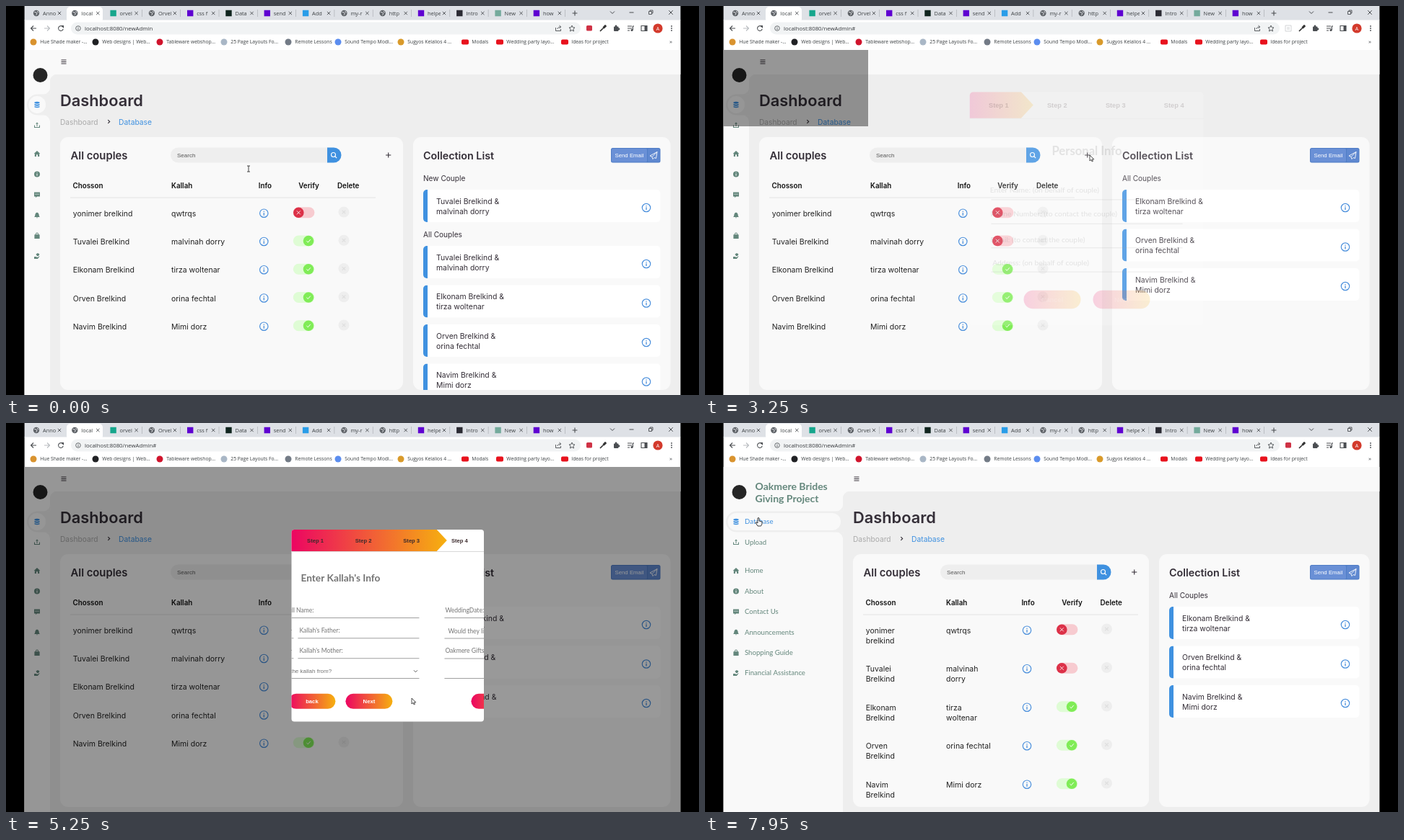
An HTML page with a canvas that plays this animation: 960x540 px, repeating every 8000 ms.

```html
<!DOCTYPE html>
<html lang="en">
<head>
<meta charset="utf-8">
<title>Dashboard</title>
<style>
html, body { margin: 0; width: 100%; height: 100%; overflow: hidden; background: #000; }
canvas { display: block; }
</style>
</head>
<body>
<canvas id="stage" width="960" height="540"></canvas>
<script>
const ctx = document.getElementById('stage').getContext('2d');
const LOOP = 8000, STEP = 50;
const UI = 'Inter, sans-serif', CHROME = '"Open Sans", sans-serif';
const ARIAL = '"Liberation Sans", Arial, sans-serif', LATO = 'Lato, sans-serif';
const BLUE = '#3f91e0', INK = '#342e37', GREEN = '#64877c', PANEL = '#f9f9f9', GREY = '#eee';

const couples = [
  ['yonimer brelkind', 'qwtrqs'],
  ['Tuvalei Brelkind', 'malvinah dorry'],
  ['Elkonam Brelkind', 'tirza woltenar'],
  ['Orven Brelkind', 'orina fechtal'],
  ['Navim Brelkind', 'Mimi dorz']
];

const clamp = k => Math.max(0, Math.min(1, k));
const smooth = k => (k = clamp(k), k * k * (3 - 2 * k));
const lerp = (a, b, k) => a + (b - a) * k;
const between = (t, a, b) => t >= a && t < b;

function text(s, x, y, size, color = INK, font = UI, weight = 400, align = 'left') {
  ctx.font = `${weight} ${size}px ${font}`;
  ctx.fillStyle = color;
  ctx.textAlign = align;
  ctx.fillText(s, x, y + size * 0.36);
}
function box(x, y, w, h, color, r = 0) {
  ctx.fillStyle = color;
  ctx.beginPath();
  ctx.roundRect(x, y, w, h, r);
  ctx.fill();
}
function dot(x, y, r, color) {
  ctx.fillStyle = color;
  ctx.beginPath();
  ctx.arc(x, y, r, 0, 7);
  ctx.fill();
}
function ring(x, y, r, color, width = 1, from = 0, to = 7) {
  ctx.strokeStyle = color;
  ctx.lineWidth = width;
  ctx.beginPath();
  ctx.arc(x, y, r, from, to);
  ctx.stroke();
}
function shape(d, x, y, stroke, width = 1, fill) {
  const path = new Path2D(d);
  ctx.save();
  ctx.translate(x, y);
  if (fill) { ctx.fillStyle = fill; ctx.fill(path); }
  if (stroke) { ctx.strokeStyle = stroke; ctx.lineWidth = width; ctx.stroke(path); }
  ctx.restore();
}
function clipped(x, y, w, h, r, draw) {
  ctx.save();
  ctx.beginPath();
  ctx.roundRect(x, y, w, h, r);
  ctx.clip();
  draw();
  ctx.restore();
}
const cross = (x, y, r, color, width = 1) => shape(`M${-r} ${-r}L${r} ${r}M${r} ${-r}L${-r} ${r}`, x, y, color, width);
const plus = (x, y, r, color) => shape(`M${-r} 0H${r}M0 ${-r}V${r}`, x, y, color, 1.1);
const chevron = (x, y) => shape('M-2.5 -1.2L0 1.3L2.5 -1.2', x, y, '#555', 1);
const line = (x1, x2, y, color) => box(x1, y - 0.5, x2 - x1, 1, color);

/* ---------- browser frame ---------- */

const tabs = [
  ['Anno', 'globe'], ['local', 'globe'], ['orvel', '#16a68c'], ['Orvel', 'globe'], ['css f', '#5f01d1'],
  ['Data', '#10251f'], ['send', '#5f01d1'], ['Add', '#2a9de8'], ['my-r', 'globe'], ['http', 'globe'],
  ['helpe', '#5f01d1'], ['Intro', '#2b2b33'], ['New', '#74aa9c'], ['how', '#5f01d1']
];
const bookmarks = [
  [38, '#d9932f', 'Hue Shade maker -...'], [124, '#202124', 'Web designs | Web...'], [213, '#d0142c', 'Tableware webshop...'],
  [302, '#a9b7c6', '25 Page Layouts Fo...'], [391, '#737b86', 'Remote Lessons'], [460, '#5b8def', 'Sound Tempo Modi...'],
  [547, '#d99a2b', 'Sugyos Kelalios 4 ...'], [636, '#e8121d', 'Modals'], [684, '#e8121d', 'Wedding party layo...'],
  [774, '#e8121d', 'Ideas for project']
];

function globe(x, y) {
  dot(x, y, 4.2, '#5f6368');
  shape('M-2.8 -1.5L0 -1L1 1L-.5 2.8M1.2 -3L2.8 -.5', x, y, '#dfe1e5', 1);
}

function browser(t) {
  const loading = between(t, 1700, 2450), dark = '#4a4d51';
  box(25, 0, 910, 20, '#dee1e6');
  box(25, 19.5, 910, 41.5, '#fff');
  box(84, 1, 50, 22, '#fff', 5);
  tabs.forEach(([name, icon], i) => {
    const x = 42 + i * 53.3;
    if (i === 1 && loading) ring(x, 10, 4, '#9aa0a6', 1, t / 90, t / 90 + 1.6);
    else if (icon === 'globe') globe(x, 10);
    else box(x - 4.2, 5.8, 8.4, 8.4, icon);
    clipped(x + 8, 2, 19, 16, 0, () => text(name, x + 9, 10, 7.4, '#3c4043', CHROME));
    cross(x + 32, 10, 2.2, dark, 0.9);
    if (i > 1) box(x + 39.5, 5, 0.6, 10, '#a5a8ad');
  });
  plus(788, 10, 3.4, dark);
  shape('M-3 -1.5L0 1.5L3 -1.5', 840, 9, dark);
  line(863.5, 869.5, 9, dark);
  shape('M-2.5 -1.5H1.5V2.5H-2.5ZM-1 -1.5V-3H3V1H1.5', 893, 9, dark, 0.9);
  cross(921, 9, 2.8, dark);

  shape('M4 0H-3.5M0 -3.5L-3.5 0L0 3.5', 38, 31, dark, 1.1);
  shape('M-4 0H3.5M0 -3.5L3.5 0L0 3.5', 57, 31, '#b9bcc0', 1.1);
  if (loading) cross(76, 31, 3, dark, 1.1);
  else {
    ring(76, 31, 3.4, dark, 1.1, 0.3, 5.6);
    shape('M0 -4H4V0Z', 76, 31, null, 0, dark);
  }
  box(90, 22.5, 706, 17, '#f1f3f4', 8.5);
  ring(100, 31, 3.3, dark, 0.8);
  shape('M0 -.4V2M0 -2V-1.2', 100, 31, dark, 0.9);
  text('localhost:8080/newAdmin' + (t >= 3250 ? '#' : ''), 109, 31, 7.8, '#35383c', CHROME);

  shape('M-3.5 -1V3.5H3.5V1M-1 1C-1 -1 1 -2 3.5 -2M1.5 -4L3.8 -2L1.5 0', 765, 31, dark, 0.9);
  shape('M0 -4L1.2 -1.3L4 -1L1.9 1L2.5 4L0 2.5L-2.5 4L-1.9 1L-4 -1L-1.2 -1.3Z', 784, 31, dark, 0.9);
  if (between(t, 2450, 4550)) {
    shape('M-4 -4H4V4H-4ZM-2 -1H2M-2 1H2', 808, 31, '#d2d4d6', 1);
  } else box(804, 27, 8, 7.5, '#cf3245', 1.5);
  shape('M-4 4L1 -1M0 -2L2 0M1 -2L3 -4L4 -3L2 -1Z', 827, 31, '#333', 1.7);
  box(842, 28.5, 6.5, 6.5, dark, 1);
  dot(845, 28, 1.4, dark);
  dot(849, 32, 1.4, dark);
  shape('M-4 -3H2M-4 0H2M-4 3H-1M3.3 -3V2.5M3 -3H5', 865, 31, dark, 1.2);
  dot(867, 33.5, 1.5, dark);
  shape('M-4 -3.5H4V3.5H-4Z', 884, 31, dark, 1.1);
  box(884.5, 27.5, 3.5, 7, dark);
  dot(903, 31, 6.6, '#d33a2c');
  text('A', 903, 31, 7, '#fff', CHROME, 400, 'center');
  [-3, 0, 3].forEach(d => dot(922, 31 + d, 0.9, dark));

  bookmarks.forEach(([x, color, name], i) => {
    if (i > 6) box(x - 5, 46.5, 10, 7, color, 2);
    else dot(x, 50, 4.5, color);
    text(name, x + 9.3, 50, 6.75, '#3c4043', CHROME);
  });
  text('»', 921, 49.5, 8, dark, CHROME, 400, 'center');
}

/* ---------- dashboard ---------- */

const menu = [
  ['Database', 137], ['Upload', 165.5], ['Home', 205], ['About', 233.5], ['Contact Us', 262],
  ['Announcements', 290.5], ['Shopping Guide', 319], ['Financial Assistance', 347]
];
const menuIcons = [
  'M-3.5 -3.5Q0 -5 3.5 -3.5V-2Q0 -.5 -3.5 -2ZM-3.5 -1Q0 .5 3.5 -1V1Q0 2.3 -3.5 1ZM-3.5 2Q0 3.3 3.5 2V3.5Q0 5 -3.5 3.5Z',
  'M-4 0H-3V2.5H3V0H4V3.5H-4ZM-.5 1.5V-2H-2L0 -4L2 -2H.5V1.5Z',
  'M-4.3 0L0 -4L4.3 0H3.2V4H1V1.2H-1V4H-3.2V0Z',
  'M-4 0A4 4 0 1 1 4 0A4 4 0 1 1 -4 0Z',
  'M-4 -3.5H4V2.5H0L-2 4V2.5H-4Z',
  'M-4 2.5Q-2.7 1.5 -2.6 -1Q-2.3 -3.6 0 -4Q2.3 -3.6 2.6 -1Q2.7 1.5 4 2.5ZM-1 3H1Q0 5 -1 3Z',
  'M-3.6 -1.8H3.6V4H-3.6ZM-2 -1.8V-2.5A2 2 0 0 1 2 -2.5V-1.8H1.1V-2.3A1.1 1.1 0 0 0 -1.1 -2.3V-1.8Z',
  'M-4 1H-1L0 2L4 0L1 4H-4ZM1 -4L3.5 -2.5L2 0H0L-1.5 -2.5Z'
];

function infoIcon(x, y) {
  ring(x, y, 5.7, '#4a8fdc', 1.2);
  shape('M0 -.8V3M0 -3V-1.8', x, y, '#4a8fdc', 1.3);
}

function toggle(x, y, on) {
  const green = on > 0.5, cx = lerp(x - 6.7, x + 7, on);
  box(x - 14.2, y - 7.5, 29.6, 15, green ? '#dffcd5' : '#f7cbd0', 7.5);
  dot(cx, y, 7.3, green ? '#80ec57' : '#dc3148');
  if (green) shape('M-2.6 .2L-.7 2L2.8 -2', cx, y, '#fff', 1);
  else cross(cx, y, 2.5, '#f9dfe2', 1);
}

function sidebar(right, open) {
  box(25, 61, right - 25, 479, PANEL);
  box(right - 0.5, 61, 935.5 - right, 34, PANEL);
  shape('M0 0H11A11 11 0 0 0 0 11Z', right - 0.5, 94.5, null, 0, PANEL);
  box(29, 122.5, right - 28, 29, GREY, [14.5, 0, 0, 14.5]);
  shape('M0 0V-10A10 10 0 0 1 -10 0Z', right + 0.2, 122.7, null, 0, GREY);
  shape('M0 0V10A10 10 0 0 0 -10 0Z', right + 0.2, 151.3, null, 0, GREY);
  box(31.5, 125, lerp(55, 188, open) - 31.5, 24, PANEL, 12);
  dot(47.5, 96, 10, '#262626');
  menu.forEach(([, y], i) => shape(menuIcons[i], 43, y, null, 0, i ? GREEN : BLUE));
  shape('M0 -.5V2.2M0 -2.3V-1.3', 43, 233.5, '#fff', 1);
  [-2, 0, 2].forEach(d => dot(43 + d, 261.2, 0.6, '#fff'));
  if (open > 0) clipped(25, 61, right - 28, 479, 0, () => {
    text('Oakmere Brides', 69.5, 88, 14, GREEN, LATO, 700);
    text('Giving Project', 69.5, 105, 14, GREEN, LATO, 700);
    menu.forEach(([name, y], i) => text(name, 55, y, 9.6, i ? GREEN : BLUE, LATO));
  });
  [-2.5, 0, 2.5].forEach(d => line(right + 15.5, right + 22.5, 77.5 + d, INK));
}

function couplesTable(x, right, t, open) {
  const wrap = open > 0.35, pitch = wrap ? 53.5 : 39.25;
  const at = (a, b) => x + lerp(a, b, open);
  const kallah = at(154, 129), info = at(282.3, 241), verify = at(337, 296), del = at(393, 351.5);
  const end = at(437, 395), search = at(153, 121);

  box(x, 182, right - x, 351, PANEL, 11);
  text('All couples', x + 14.5, 207.5, 14.8, INK, UI, 600);
  box(search, 196.5, 218, 21, GREY, [10.5, 0, 0, 10.5]);
  text('Search', search + 9, 207, 8, '#555', ARIAL);
  box(search + 217, 196.5, 19.5, 21, BLUE, [0, 10.5, 10.5, 0]);
  ring(search + 225.5, 206.5, 3, '#fff', 1.1);
  shape('M0 0L2.5 2.5', search + 227.7, 208.7, '#fff', 1.2);
  plus(right - 20.3, 207, 3.6, INK);

  const head = (s, hx, align) => text(s, hx, 249, 9.8, '#111', UI, 600, align);
  head('Chosson', x + 17.5);
  head('Kallah', kallah);
  head('Info', info + 1.5, 'center');
  head('Verify', verify + 7.5, 'center');
  head('Delete', del + 6.2, 'center');
  line(x + 14, end, 266, '#e3e3e3');

  clipped(x, 266, right - x, 254, 0, () => couples.forEach(([chosson, bride], i) => {
    const y = 288 + i * pitch;
    const hover = i === 1 && between(t, 1050, 2500);
    if (hover) box(x + 14, y - 22.2, end - x - 14, 38.8, '#ececec');
    const parts = wrap ? chosson.split(' ') : [chosson];
    const brideParts = wrap && bride.length > 13 ? bride.split(' ') : [bride];
    parts.forEach((s, n) => text(s, x + 17.7, y + n * 14.2, 10.5, '#222'));
    brideParts.forEach((s, n) => text(s, kallah, y + n * 14.2, 10.5, '#222'));
    infoIcon(info, y - 0.3);
    const on = i === 0 ? 0 : i === 1 ? 1 - clamp((t - 1650) / 200) : 1;
    if (i === 1 && between(t, 1650, 2450)) {
      box(verify - 16, y - 10, 32.5, 17.5, '#111', 8.7);
      box(verify - 15, y - 9, 30.5, 15.5, '#fff', 7.7);
    }
    toggle(verify, y - 1.2, on);
    dot(del, y - 2, 7.5, hover ? '#d3313f' : '#eee');
    cross(del, y - 2, 2.3, hover ? '#fff' : '#e0e0e0', hover ? 1.8 : 1.3);
  }));
}

function collection(x, t) {
  box(x, 182, 920.5 - x, 351, PANEL, 11);
  text('Collection List', x + 14, 207.5, 14.3, INK, UI, 600);
  box(838, 197, 68.5, 20.5, '#4f7dc6', 2.5);
  box(839, 198, 49, 18.5, '#6a90d6', 1.5);
  box(889, 198, 16.5, 18.5, '#5f88d0', 1.5);
  text('Send Email', 843.5, 207.2, 7.8, '#fff', ARIAL);
  shape('M5 -5L-5 .5L-2 2L-1 5L1 3L3.5 4ZM5 -5L-2 2', 897, 207.5, '#fff', 0.9);

  const card = ([chosson, bride], y) => {
    box(x + 15, y, 891.5 - x, 45, '#fff', 5);
    clipped(x + 14, y, 40, 45, 5, () => box(x + 14, y, 6, 45, BLUE));
    text(chosson + ' &', x + 32, y + 16, 10.4);
    text(bride, x + 32, y + 30, 10.4);
    infoIcon(887, y + 25);
  };
  clipped(x, 182, 921 - x, 351, 11, () => {
    const reloaded = t >= 2450, top = reloaded ? 255 : 333;
    if (!reloaded) {
      text('New Couple', x + 14, 239.7, 10.1);
      card(couples[1], 255);
    }
    text('All Couples', x + 14, top - 15.5, 10.1);
    couples.slice(reloaded ? 2 : 1).forEach((c, i) => card(c, top + i * 54.5));
  });
}

function page(t) {
  const open = smooth((t - 7270) / 320);
  const right = 61 + 130 * open, left = right + 14;
  box(25, 61, 910, 479, GREY);
  sidebar(right, open);
  text('Dashboard', left, 131.5, 21.8, INK, UI, 600);
  text('Dashboard', left, 161, 10.2, '#aaa');
  shape('M-1.2 -2.3L1.2 0L-1.2 2.3', left + 67.5, 160.5, INK, 1.1);
  text('Database', left + 81, 161, 10.3, BLUE);
  couplesTable(left, lerp(550, 615, open), t, open);
  collection(lerp(564, 629, open), t);
}

/* ---------- step form ---------- */

const slideStarts = [3966, 4550, 5150], slideWidths = [259, 256, 253];

function warmGradient(x1, x2) {
  const g = ctx.createLinearGradient(x1, 0, x2, 0);
  g.addColorStop(0, '#ec0562');
  g.addColorStop(1, '#f6b00f');
  return g;
}
function formButtons(cx, y, labels) {
  labels.forEach((label, i) => {
    const x = cx + (i ? 7 : -72);
    box(x, y - 10.5, 65, 21, warmGradient(x, x + 65), 10.5);
    text(label, x + 32.5, y, 7.7, '#fff', ARIAL, 700, 'center');
  });
}
const formLine = (cx, a, b, y) => line(cx + a, cx + b, y, '#a0a0a0');
const label = (s, x, y, font = LATO, align) => text(s, x, y, font === LATO ? 8.5 : 8, '#757575', font, 400, align);
const heading = (s, cx) => text(s, cx, 215.5, 13.7, '#747474', LATO, 700, 'center');

function personalPage(cx) {
  heading('Personal Info', cx);
  [['Enter Name: (on behalf of couple)', 14, 260], ['Phone Number: (to contact the couple)', 34.5, 286.7],
   ['Email: (to contact the couple)', -2, 316.3], ['Address: (on behalf of couple)', 2.5, 343]
  ].forEach(([s, end, y], i) => {
    label(s, cx + end, y, LATO, 'right');
    formLine(cx, -109, 109, 271 + i * 27.5);
  });
  formButtons(cx, 385, ['Cancel', 'Next']);
}
function familyPage(cx, who, back) {
  heading(`Enter ${who}'s Info`, cx);
  label(`${who}'s Full Name:`, cx - 107, 260);
  formLine(cx, -109, 109, 270.5);
  ['Father', 'Mother'].forEach((parent, i) => {
    const y = 288.3 + i * 28;
    label('Title', cx - 103, y - 0.3, ARIAL);
    chevron(cx - 70, y);
    formLine(cx, -109, -65, y + 10.5);
    label(`${who}'s ${parent}:`, cx - 57, y);
    formLine(cx, -59, 109, y + 10.5);
  });
  label(`Where is the ${who.toLowerCase()} from?`, cx - 103, 344, ARIAL);
  chevron(cx + 104, 344.5);
  formLine(cx, -109, 109, 354.5);
  formButtons(cx, 386.3, [back, 'Next']);
}
function weddingPage(cx) {
  heading('Wedding Info', cx);
  label('WeddingDate:', cx - 108, 260);
  label('Would they like a shower?', cx - 104, 288.5);
  label('Oakmere Gifts:', cx - 108, 316.3);
  [270.5, 299, 327, 354.5].forEach(y => formLine(cx, -109, 109, y));
  formButtons(cx, 386.3, ['Back', 'Submit']);
}

function modal(t) {
  if (!between(t, 3250, 6250)) return;
  const enter = clamp((t - 3190) / 260), leave = clamp((t - 6000) / 250);
  const alpha = enter ** 1.2 * (1 - leave);
  if (t < 3300) box(25, 61, 201, 106, 'rgba(0,0,0,.4)');
  else box(25, 61, 910, 479, `rgba(0,0,0,${0.4 * alpha})`);

  const moved = duration => slideStarts.map(s => smooth((t - s) / duration));
  const scroll = moved(300).reduce((sum, k, i) => sum + k * slideWidths[i], 0);
  const tip = 468 + 66.5 * moved(415).reduce((a, b) => a + b);
  const scale = 1.28 - 0.28 * enter;

  ctx.save();
  ctx.globalAlpha = alpha;
  ctx.translate(529, 281);
  ctx.scale(scale, scale);
  ctx.translate(-529, -281);
  clipped(395.5, 148, 266.5, 266.5, 4, () => {
    box(395, 148, 268, 267, '#fff');
    line(395, 663, 178.5, '#d8d8d8');
    shape(`M395 148H${tip - 14}L${tip} 163L${tip - 14} 178H395Z`, 0, 0, null, 0, warmGradient(395, tip));
    for (let i = 0; i < 4; i++) text(`Step ${i + 1}`, 428.5 + i * 66.6, 163, 7.6, '#3b2a2c', ARIAL, 700, 'center');
    const start = 529 - scroll;
    personalPage(start);
    familyPage(start + 259, 'Chosson', 'Back');
    familyPage(start + 515, 'Kallah', 'back');
    weddingPage(start + 768);
  });
  ctx.restore();
}

/* ---------- pointer ---------- */

const pointerPath = [
  [600, 336, 226], [1050, 382, 307], [1200, 382, 307], [1300, 433, 316], [1450, 433, 316], [1500, 425, 322],
  [1650, 421, 324], [2450, 421, 324], [2650, 530, 206], [2800, 533, 207], [3550, 533, 207], [3650, 555, 370],
  [3850, 562, 382], [5700, 562, 382], [5950, 355, 91], [6550, 355, 91], [6950, 88, 82], [7150, 83, 79],
  [7550, 83, 79], [7850, 74, 132]
];

function pointer(t) {
  const next = pointerPath.findIndex(p => p[0] > t);
  const b = pointerPath[next < 0 ? pointerPath.length - 1 : next];
  const a = next > 0 ? pointerPath[next - 1] : b;
  const k = a === b ? 0 : smooth((t - a[0]) / (b[0] - a[0]));
  const x = lerp(a[1], b[1], k), y = lerp(a[2], b[2], k);
  if (t < 1000) shape('M-2 -4H2M0 -4V4M-2 4H2', x, y, '#333', 0.9);
  else if (t >= 7750) shape('M-1 0Q0 -1 1 0V4L5 5V8L3.5 11H-1L-4 6Q-3 5 -1 7Z', x, y, '#222', 0.9, '#fff');
  else shape('M0 0V8L1.9 6.3L3.2 9L4.4 8.4L3.2 5.9H5.8Z', x, y, '#222', 0.8, '#fff');
}

function frame() {
  const t = Math.floor(performance.now() % LOOP / STEP) * STEP;
  box(0, 0, 960, 540, '#000');
  clipped(25.6, 0, 908.8, 540, 0, () => {
    browser(t);
    page(t);
    modal(t);
    pointer(t);
  });
  requestAnimationFrame(frame);
}
frame();
</script>
</body>
</html>
```
